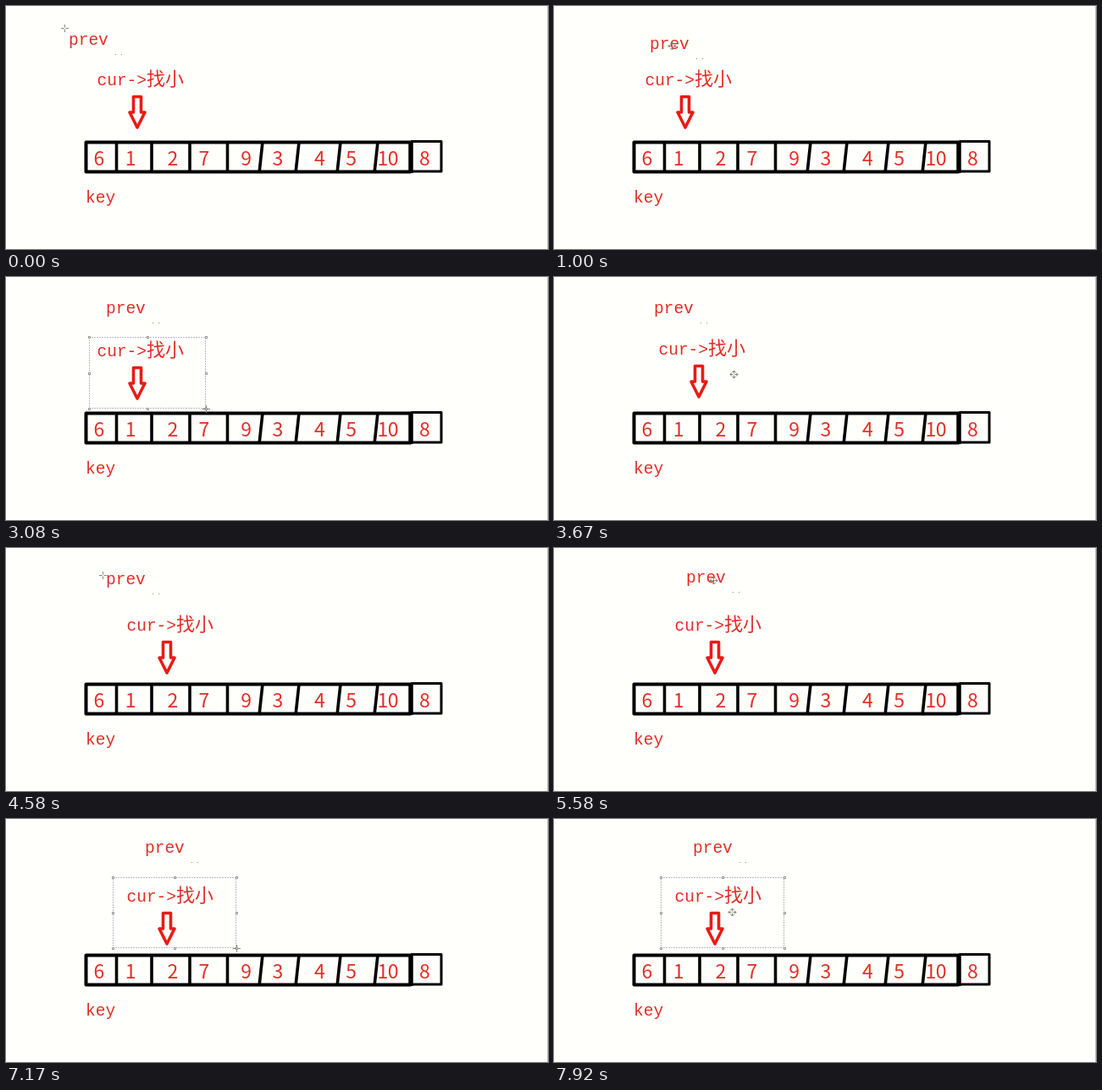
Write an HTML page with a canvas that moves like this. It is 640 by 288 pixels and loops after 8000 ms.

```html
<!DOCTYPE html>
<html lang="zh">
<head>
<meta charset="utf-8">
<title>prev / cur</title>
<style>
  html, body { margin: 0; width: 100%; height: 100%; overflow: hidden; background: #fffffc; }
  canvas { display: block; }
</style>
</head>
<body>
<canvas id="stage" width="640" height="288"></canvas>
<script>
const ctx = document.getElementById("stage").getContext("2d");
const LOOP = 8000, FPS = 12;
const TRAVEL = 500, REACH = 170, LAG = 25; // ms
const RED = "#e22e26";
const LATIN = '19.5px "Liberation Mono", monospace';
const DIGITS = '23px "Noto Sans CJK SC", "Noto Sans CJK", sans-serif';
const HAN = '22px "Noto Sans CJK SC", "Noto Sans CJK", sans-serif';

// Each gesture draws a marquee from press to release, then drags a label from grab to drop.
const gestures = [
  { label: "prev", press: 250, release: 500, from: [65, 24], to: [140, 68], bow: 0,
    grab: 667, drop: 1167, hold: [100, 42], by: [44, -3], sag: 9 },
  { label: "cur", press: 2420, release: 3080, from: [98, 71], to: [236, 156], bow: 0,
    grab: 3524, drop: 4080, hold: [196, 117], by: [35, 4], sag: -5 },
  { label: "prev", press: 4667, release: 5000, from: [111, 29], to: [190, 67], bow: 0,
    grab: 5420, drop: 5700, hold: [150, 40], by: [46, -3], sag: 0 },
  { label: "cur", press: 6155, release: 7083, from: [126, 69], to: [272, 153], bow: 22,
    grab: 7670, drop: 7670, hold: [210, 110], by: [0, 0], sag: 0 }
];

const smooth = p => p * p * (3 - 2 * p);
const easeOut = p => p * (2 - p);
const add = (a, b) => [a[0] + b[0], a[1] + b[1]];

// Rests at a before start and at b after end; bow bends the way between.
function glide(a, b, start, end, t, ease, bow = 0) {
  const p = t >= end ? 1 : Math.max(0, (t - start) / (end - start));
  const k = ease(p);
  return [a[0] + (b[0] - a[0]) * k, a[1] + (b[1] - a[1]) * k + bow * Math.sin(Math.PI * p)];
}

const dragged = (g, t) => glide([0, 0], g.by, g.grab, g.drop, t, easeOut, g.sag);
const corner = (g, t) => glide(g.from, g.to, g.press, g.release, t, smooth, g.bow);

function labelOffset(label, t) {
  return gestures.filter(g => g.label === label)
    .reduce((sum, g) => add(sum, dragged(g, t)), [0, 0]).map(Math.round);
}

function cursorAt(t) {
  let pos = [69, 26];
  for (const g of gestures) {
    pos = glide(pos, g.from, Math.max(0, g.press - TRAVEL), g.press, t, easeOut);
    if (t >= g.press) pos = corner(g, t);
    pos = glide(pos, g.hold, g.grab - REACH, g.grab, t, easeOut);
    pos = add(pos, dragged(g, t));
  }
  return pos.map(Math.round);
}

function text(string, x, y, font, align = "left") {
  ctx.font = font;
  ctx.textAlign = align;
  ctx.fillStyle = RED;
  ctx.fillText(string, x, y);
}

function line(points, width, color = "#000", closed = false) {
  ctx.beginPath();
  points.forEach(([x, y]) => ctx.lineTo(x, y));
  if (closed) ctx.closePath();
  ctx.lineWidth = width;
  ctx.strokeStyle = color;
  ctx.stroke();
}

function box(x0, y0, x1, y1, width) {
  line([[x0, y0], [x1, y0], [x1, y1], [x0, y1]], width, "#000", true);
}

function drawArray() {
  box(94.5, 161.5, 477.5, 196.5, 4);
  box(479, 160.5, 514, 196, 3);
  line([[478, 160], [478, 198]], 5);
  [130.5, 172, 217, 261.5, 301, 344, 393, 437].forEach((x, i) => {
    const lean = i > 3 ? 2 : 0;
    line([[x + lean, 161], [x - lean, 198]], 3.6);
  });
  [..."6  1   2  7   9  3   4  5  10  8"].forEach((digit, i) =>
    text(digit, 110 + i * 12.4, 189, DIGITS, "center"));
  text("key", 94, 233, LATIN);
}

function drawPrev(x, y) {
  text("prev", 74 + x, 46 + y, LATIN);
  ctx.fillStyle = "#a8806a";
  ctx.fillRect(129 + x, 57 + y, 1, 1);
  ctx.fillRect(136 + x, 57 + y, 1, 1);
}

function drawCur(x, y) {
  text("cur->", 107.5 + x, 94 + y, LATIN);
  text("找小", 166 + x, 94 + y, HAN);
  const half = [[4.5, 107.5], [4.5, 126], [9, 126], [0, 144]];
  const mirrored = half.slice(0, -1).reverse().map(([dx, dy]) => [-dx, dy]);
  const arrow = [...half, ...mirrored].map(([dx, dy]) => [155 + dx + x, dy + y]);
  line(arrow, 3.6, "#ea1a16", true);
}

function marquee([x0, y0], [x1, y1], color, dash) {
  ctx.setLineDash(dash);
  ctx.lineDashOffset = 0.5;
  ctx.lineWidth = 1;
  ctx.strokeStyle = color;
  ctx.strokeRect(x0 + 0.5, y0 + 0.5, Math.max(1, x1 - x0 - 1), Math.max(1, y1 - y0 - 1));
  ctx.setLineDash([]);
}

function handles([x0, y0], [x1, y1]) {
  for (const i of [0, 1, 2]) for (const j of [0, 1, 2]) {
    if (i === 1 && j === 1) continue;
    const x = Math.round(x0 + (x1 - x0) * i / 2), y = Math.round(y0 + (y1 - y0) * j / 2);
    ctx.fillStyle = "#9a9a9a";
    ctx.fillRect(x - 1, y - 1, 3, 3);
    ctx.fillStyle = "#fff";
    ctx.fillRect(x, y, 1, 1);
  }
}

function drawSelection(g, t) {
  if (t <= g.release) {
    marquee(g.from, corner(g, t - LAG).map(Math.round), "#505048", [2, 1]);
  } else if (t < g.grab || t >= g.drop) {
    const shift = dragged(g, t).map(Math.round);
    const a = add(g.from, shift), b = add(g.to, shift);
    marquee(a, b, "#b4bcc4", [2, 1]);
    handles(a, b);
  }
}

function drawCursor([x, y], moving) {
  ctx.save();
  ctx.translate(x + 0.5, y + 0.5);
  for (let i = 0; i < 4; i++) {
    line([[1, 0], [4.5, 0]], 1, "#85857a");
    if (moving) line([[2.5, -2], [4.5, 0], [2.5, 2]], 1, "#77776a");
    ctx.rotate(Math.PI / 2);
  }
  ctx.restore();
}

function frame(now) {
  const t = Math.floor(((now + 4) % LOOP) * FPS / 1000) * 1000 / FPS;
  ctx.lineJoin = "round";
  ctx.fillStyle = "#fffffc";
  ctx.fillRect(0, 0, 640, 288);
  ctx.fillStyle = "#c4c4c0";
  ctx.fillRect(639, 0, 1, 288);

  drawArray();
  drawPrev(...labelOffset("prev", t));
  drawCur(...labelOffset("cur", t));

  const active = gestures.findIndex((g, i) => {
    const next = gestures[i + 1]?.press ?? Infinity;
    return t >= g.press && t < next - 100;
  });
  if (active >= 0) drawSelection(gestures[active], t);
  const moving = gestures.some((g, i) => {
    const next = gestures[i + 1]?.press ?? Infinity;
    return t >= g.grab - REACH / 2 && t < next - TRAVEL;
  });
  drawCursor(cursorAt(t), moving);
  requestAnimationFrame(frame);
}
requestAnimationFrame(frame);
</script>
</body>
</html>
```
